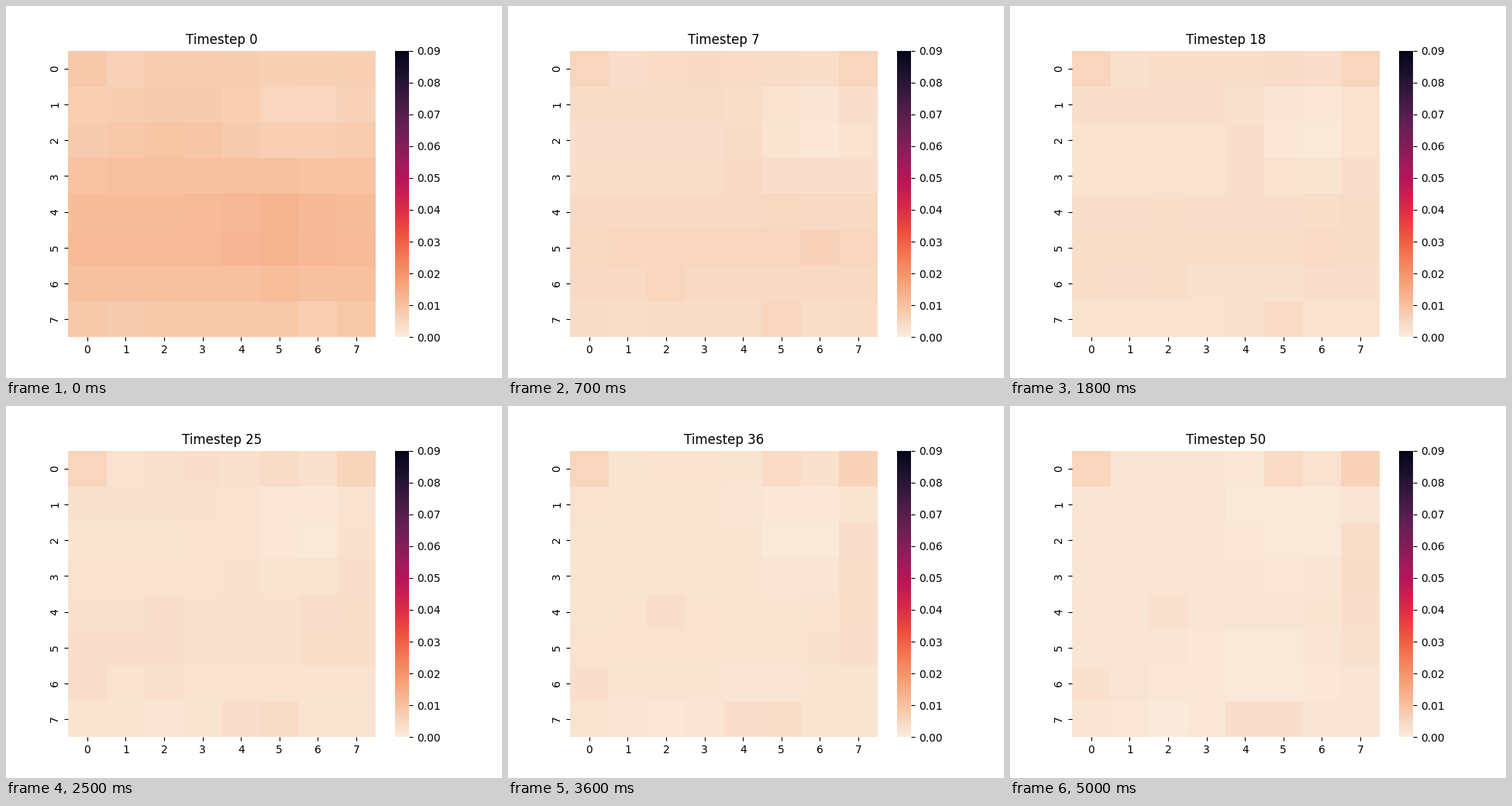
A matplotlib script for the animation above (5100 ms loop, 640 by 480 pixels).

```python
import matplotlib.pyplot as plt
import numpy as np
from matplotlib.animation import FuncAnimation
from matplotlib.colors import LinearSegmentedColormap

STEPS = 51
STEP_MS = 100
SIZE = 8
SETTLE_STEP = 11
UNIT = 1e-4

ROWS, COLS = np.mgrid[:SIZE, :SIZE]

COLORS = ["#faebdd", "#f7c9aa", "#f6a47c", "#f47d57", "#ed503e", "#d92847",
          "#b91657", "#921c5b", "#691f55", "#451c47", "#221331", "#03051a"]


def row_wave(level, height, peak, period):
    return level + height * np.cos(2 * np.pi * (ROWS - peak) / period)


def bumps(*peaks):
    """Sum of Gaussian bumps given as (row, column, height, width)."""
    return sum(h * np.exp(-((ROWS - r) ** 2 + (COLS - c) ** 2) / (2 * w * w))
               for r, c, h, w in peaks)


START = row_wave(91, 24, 4.7, 8) + bumps(
    (4.4, 4.9, 25, 0.75), (1.2, 5.6, -18, 0.9), (1.5, 2.4, 16, 1.0),
    (0, 0, 12, 0.5), (0, 1, -12, 0.4), (7, 6, -18, 0.4), (7, 1, -8, 0.5))

SETTLED = row_wave(33, 8, 4.8, 4.7) + bumps(
    (0, 0, 14, 0.4), (0, 1, -13, 0.4), (0, 7, 16, 0.4), (1.3, 5.8, -25, 0.9),
    (2.5, 4, 19, 0.5), (5, 6, 12, 0.5), (6, 2, 10, 0.5), (7, 5, 20, 0.4))

END = 15 + bumps(
    (0, 0, 38, 0.4), (0, 7, 48, 0.4), (0, 5.2, 34, 0.45), (1, 5, -10, 0.8),
    (2.5, 7, 35, 0.5), (4.4, 7, 20, 0.6), (2.2, 6, -9, 0.6), (4, 2, 11, 0.4),
    (6, 0, 13, 0.4), (5.7, 4.6, -10, 0.8), (7, 2, -8, 0.7), (7, 4.5, 32, 0.45))

# Upper rows settle faster than lower ones
DECAY = 0.46 - 0.03 * ROWS


def grid_at(step):
    """Fast exponential settling followed by a slow, easing drift."""
    drift = max(0, step - SETTLE_STEP) / (STEPS - 1 - SETTLE_STEP)
    base = SETTLED + (END - SETTLED) * drift ** 0.7
    return UNIT * np.maximum(base + (START - SETTLED) * np.exp(-DECAY * step), 4)


plt.rcParams["font.family"] = "DejaVu Sans"
fig, ax = plt.subplots(figsize=(6.4, 4.8), dpi=100)

cmap = LinearSegmentedColormap.from_list("heat", COLORS, N=256)
mesh = ax.pcolormesh(grid_at(0), cmap=cmap, vmin=0, vmax=0.09)
ax.set(xlim=(0, SIZE), ylim=(SIZE, 0))
ax.spines[:].set_visible(False)
centers = np.arange(SIZE) + 0.5
ax.set_xticks(centers, range(SIZE))
ax.set_yticks(centers, range(SIZE), rotation="vertical", va="center")

bar = fig.colorbar(mesh, ax=ax, ticks=np.arange(10) / 100, format="%.2f")
bar.outline.set_linewidth(0)
title = ax.set_title("Timestep 0")


def update(step):
    mesh.set_array(grid_at(step))
    title.set_text(f"Timestep {step}")
    return mesh, title


anim = FuncAnimation(fig, update, frames=STEPS, interval=STEP_MS,
                     repeat=True, repeat_delay=0)
plt.show()
```
